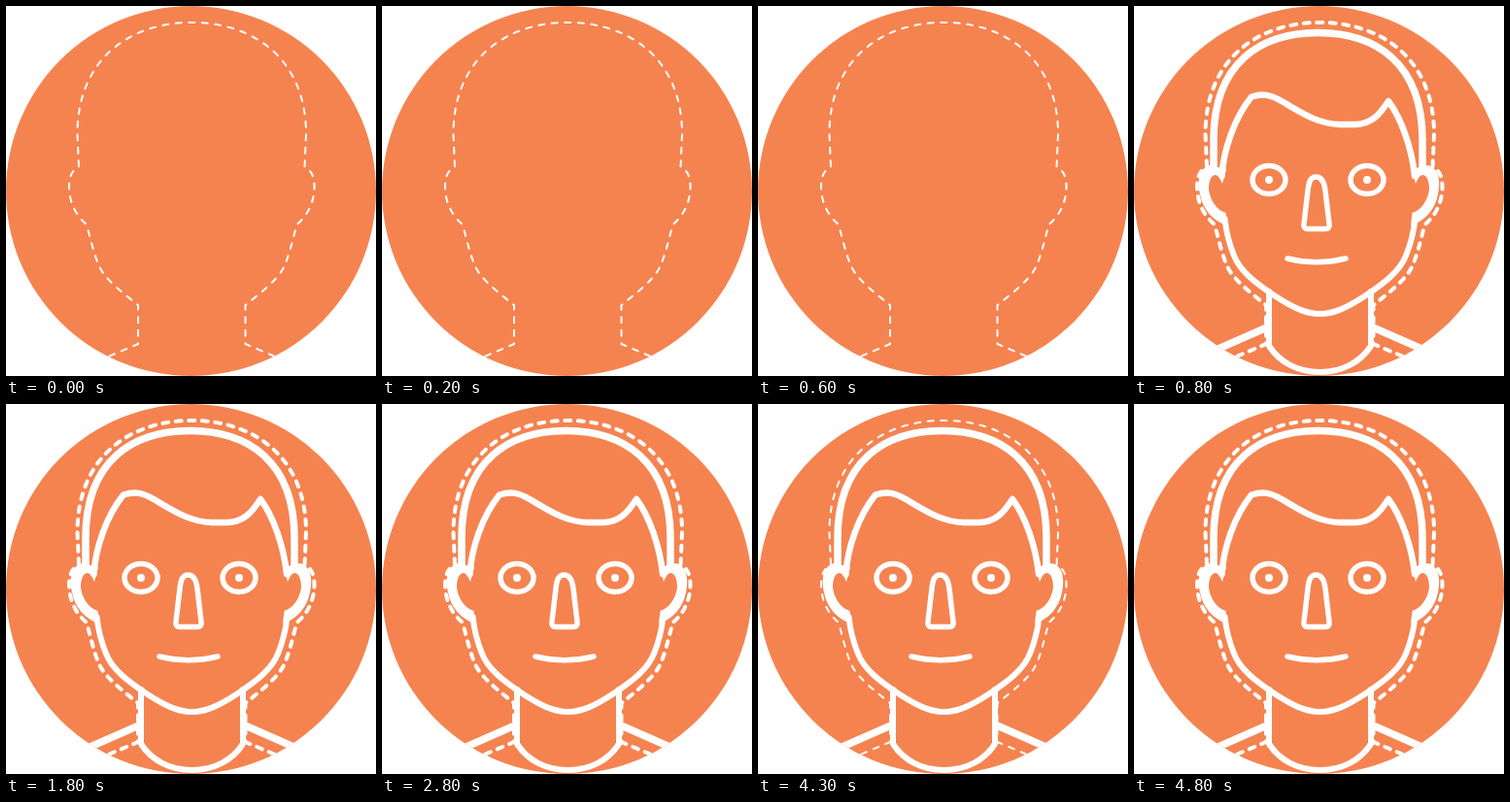
Recreate the animation shown at these times as an HTML page. Size 381 px wide and 381 px high, loop 5.3 s.

```html
<!DOCTYPE html>
<html lang="en">
<head>
<meta charset="utf-8">
<title>Head outline</title>
<style>
  html, body { margin: 0; width: 100%; height: 100%; overflow: hidden; background: #fff; }
  svg { display: block; width: 100vw; height: 100vh; }
  .line, #dashes { fill: none; stroke: #fff; stroke-linecap: round; stroke-linejoin: round; }
  .line { stroke-width: 6; }
  .fine { stroke-width: 5.5; }
  .bold { stroke-width: 7.5; }
  #dashes { stroke-dasharray: 6 7.5; stroke-dashoffset: 3; }
</style>
</head>
<body>
<svg viewBox="0 0 381 381">
  <defs>
    <clipPath id="disc"><circle cx="190.5" cy="190.5" r="190.5"/></clipPath>
    <path id="halfOutline" d="M191.2 17 C127 17 73.5 55 73.5 132 L75 166
      C67 169 65 178 65 186 C65 202 72 216 83 225
      C88 243 91 258 97 270 C103 282 121 296 136 308 V348 L103 362"/>
    <path id="ear" fill="#fff" d="M78 164 C67 167 65 180 68 194 C71 210 82 222 96 226 L94.5 213
      C84 210 78 198 77 189 C77 179 80 174 84 174 C88 175 89 179 91 183 L95 168 Z"/>
    <g id="halfBody">
      <path class="line" d="M93.5 219 C95 233 98 245 103 257 C109 273 125 285 145 298.5
        C165 311.5 178 317 191.5 317"/>
      <path class="line" d="M139 294 V350 C150 367 169 377 191.5 377"/>
      <path class="line bold" d="M138 330.5 L80 356"/>
    </g>
    <g id="eye">
      <ellipse class="line fine" rx="17" ry="14.5"/>
      <circle r="4" fill="#fff"/>
    </g>
  </defs>
  <g clip-path="url(#disc)">
    <rect width="381" height="381" fill="#f58350"/>
    <g id="dashes">
      <use href="#halfOutline"/>
      <use href="#halfOutline" transform="matrix(-1 0 0 1 382.5 0)"/>
    </g>
    <g id="face">
      <use href="#halfBody"/>
      <use href="#halfBody" transform="matrix(-1 0 0 1 383 0)"/>
      <use href="#ear"/>
      <use href="#ear" transform="matrix(-1 0 0 1 381 0)"/>
      <path class="line bold" d="M82 166 V138 C82 58 131 27.5 189.5 27.5 C248 27.5 297 58 297 138 V166"/>
      <path class="line bold" style="stroke-width:6.5" d="M90.5 175 C92 148 104 114 121 93.5 C133 89.500 141 91.500 153 98.500
        C178 114 193 121.500 212 122 H228 C246 121.500 254 110 262 98
        C275 115 286 146 289 175"/>
      <use href="#eye" x="139" y="179"/>
      <use href="#eye" x="240" y="179"/>
      <path class="line fine" d="M187.500 176 C181 176 180 182 179 190
        L175 224 Q174 229.500 179 229.500 H197 Q202 229.500 201 224 L197 190
        C196 182 194 176 187.500 176 Z"/>
      <path class="line fine" d="M158 260 Q188 267.500 218 260"/>
    </g>
  </g>
</svg>
<script>
  const LOOP = 5300, INTRO = 800;
  const THIN = 2, MEDIUM = 4, HEAVY = 7.5;
  const dashes = document.getElementById('dashes');
  const face = document.getElementById('face');

  // Quick heavy blinks first, then a slow gentle pulse around the face.
  function outlineWidth(t) {
    if (t < INTRO) return Math.floor(t / 100) % 2 ? HEAVY : THIN;
    return Math.floor((t - INTRO) / 500) % 2 ? THIN : MEDIUM;
  }

  function draw(t) {
    dashes.setAttribute('stroke-width', outlineWidth(t));
    face.setAttribute('opacity', t < 700 ? 0 : t < INTRO ? 0.5 : 1);
  }

  const start = performance.now();
  function tick() {
    draw((performance.now() - start) % LOOP);
    requestAnimationFrame(tick);
  }
  draw(0);
  requestAnimationFrame(tick);
</script>
</body>
</html>
```
